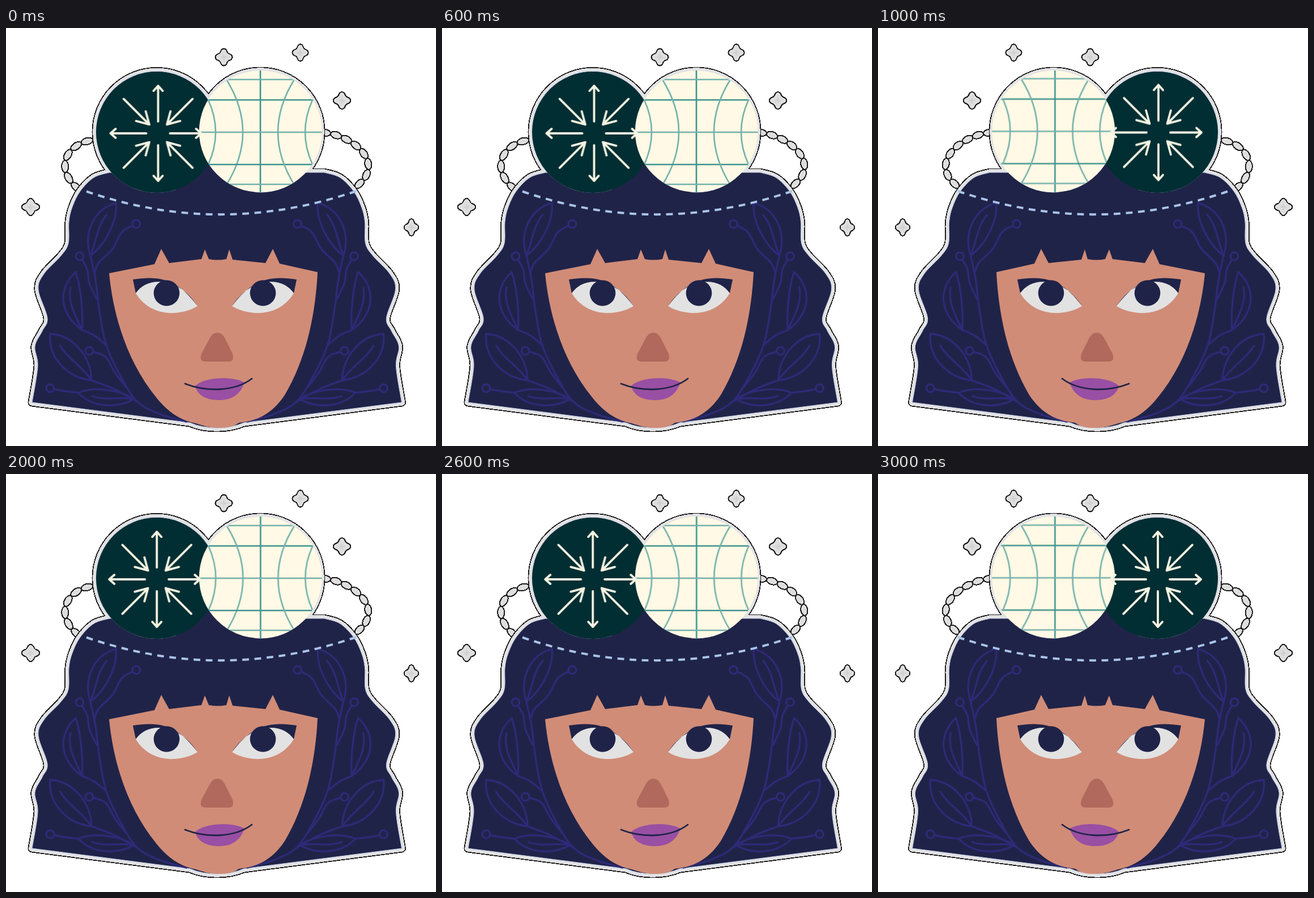
An HTML page for the animation above (4000 ms loop, 759 px wide and 738 px high).

```html
<!DOCTYPE html>
<html lang="en">
<head>
<meta charset="utf-8">
<title>Portrait sticker</title>
<style>
html, body { margin: 0; width: 100%; height: 100%; overflow: hidden; background: #fff; }
svg { display: block; width: 759px; height: 738px; }
#scene { animation: flip 2s step-end infinite; }
#grid { animation: grid 4s step-end infinite; }
#arrows { animation: arrows 4s step-end infinite; }
@keyframes flip {
  0% { transform: none; }
  50%, 100% { transform: translateX(759px) scaleX(-1); }
}
@keyframes grid {
  0% { transform: translate(449px, 184px); }
  25% { transform: translate(446.5px, 182.5px); }
  50% { transform: translate(449.3px, 184px); }
  75%, 100% { transform: translate(446.5px, 183.3px); }
}
@keyframes arrows {
  0% { transform: translate(268.5px, 186px); }
  25% { transform: translate(495px, 184.5px); }
  50% { transform: translate(266.2px, 186px); }
  75%, 100% { transform: translate(494px, 186px); }
}
.line { fill: none; stroke-linecap: round; stroke-linejoin: round; }
.rim { fill: none; stroke-linejoin: round; shape-rendering: crispEdges; }
.chip { fill: #dedede; stroke: #1c1c1c; stroke-width: 2; shape-rendering: crispEdges; }
.bud { fill: #202348; }
</style>
</head>
<body>
<svg viewBox="0 0 759 738">
  <defs>
    <path id="half"/>
    <g id="shape">
      <use href="#half"/>
      <use href="#half" transform="matrix(-1 0 0 1 744.5 0)"/>
      <circle cx="266" cy="183.5" r="107"/>
      <circle cx="449" cy="183" r="107"/>
    </g>
    <clipPath id="disc"><ellipse cx="449.3" cy="182.6" rx="108.5" ry="107.5"/></clipPath>
    <g id="vine"></g>
    <g id="eye">
      <path fill="#e2e2e2" d="M229 468C240 453 253 447 270 447C300 447 320 466 338 491C306 510 254 510 229 468Z"/>
      <circle cx="283.5" cy="468" r="22.8" fill="#202348"/>
      <path fill="#202348" d="M224 444C275 436 304 446 338 491C322 466 298 449 270 448C250 448 238 456 229 468Z"/>
    </g>
  </defs>

  <g id="scene">
    <g id="chips"></g>
    <use href="#shape" class="rim" stroke="#1c1c1c" stroke-width="15"/>
    <use href="#shape" class="rim" stroke="#e2e2e5" stroke-width="11.5"/>
    <use href="#shape" fill="#202348" stroke="#c5d2e4" stroke-width="1"/>
    <path fill="#202348" d="M300 240H440V300H300Z"/>

    <g class="line" stroke="#2e2a78" stroke-width="3.3">
      <use href="#vine"/>
      <use href="#vine" transform="matrix(-1 0 0 1 744.5 0)"/>
    </g>
    <path fill="none" stroke="#a9c4e8" stroke-width="4" pathLength="22.55" stroke-dasharray=".55 .45"
      d="M142 288.5Q378 370 618 288"/>

    <path fill="#d08c77" d="M182 433L262 417L274 390L288 415L345 408L351 391L358 408Q373 411 389 408L394 391L400 409L458 415L471 390L483 416L550 431
      C546 510 529 585 492 648C468 684 440 694 411 697C400 705 390 706 375 706C358 706 345 701 335 698C306 692 285 677 265 652C217 593 190 515 182 433Z"/>
    <use href="#eye"/>
    <use href="#eye" transform="matrix(-1 0 0 1 737 0)"/>
    <path fill="#b0695c" d="M373 538Q381 538 386 547L400 575Q404 589 392 589H353Q340 589 345 575L360 547Q365 538 373 538Z"/>
    <path fill="#994fa3" d="M334 632C350 616 400 614 421 626C413 648 398 657 376 657C354 657 338 649 334 632Z"/>
    <path class="line" stroke="#202348" stroke-width="2.8" d="M316 628C354 643 404 642 434 619"/>

    <circle cx="266" cy="184" r="107" fill="#012e33"/>
    <g clip-path="url(#disc)">
      <rect x="335" y="70" width="230" height="225" fill="#fff9e5"/>
      <g id="grid" class="line" stroke-width="2.6"></g>
    </g>
  </g>
  <g id="arrows" class="line" stroke="#f5f3e1" stroke-width="3.8"></g>
</svg>
<script>
const byId = id => document.getElementById(id);
const add = (parent, tag, attrs) => {
  const el = document.createElementNS('http://www.w3.org/2000/svg', tag);
  for (const key in attrs) el.setAttribute(key, attrs[key]);
  return byId(parent).appendChild(el);
};

// Smooth curve through "x y, x y, ..."
const spline = text => {
  const pts = text.split(',').map(p => p.trim().split(' ').map(Number));
  const at = i => pts[Math.max(0, Math.min(pts.length - 1, i))];
  const handle = (i, s) => at(i).map((v, k) => v + s * (at(i + 1)[k] - at(i - 1)[k]) / 6);
  let d = pts[0].join(' ');
  for (let i = 1; i < pts.length; i++) d += `C${[...handle(i - 1, 1), ...handle(i, -1), ...pts[i]].join(' ')}`;
  return d;
};

// Half of the hair
const wave = spline('183 255, 155 264, 131 288, 117 316, 111 342, 110 380, 97 402, 67 434, 57 462, 73 512, 64 535, 51 562, 56 597, 46 661');
byId('half').setAttribute('d', `M373 225L250 255L${wave}L325 697Q345 706 373 706`);

// Vine
const stem = text => add('vine', 'path', { d: 'M' + spline(text) });
const bud = (x, y, path) => {
  stem(`${x} ${y}, ${path}`);
  add('vine', 'circle', { class: 'bud', cx: x, cy: y, r: 6.8 });
};
const leaf = (x, y, tipX, tipY, ...sides) => {
  const dx = tipX - x, dy = tipY - y, len = Math.hypot(dx, dy);
  const at = (f, o) => `${x + dx * f - dy / len * o} ${y + dy * f + dx / len * o}`;
  for (const o of sides) add('vine', 'path', { d: `M${x} ${y}C${at(.3, o)} ${at(.75, o)} ${tipX} ${tipY}` });
  const mid = (sides[0] + sides[1]) / 2;
  add('vine', 'path', { d: `M${x} ${y}C${at(.3, mid + 5)} ${at(.5, mid - 5)} ${at(.75, mid * .8)}` });
};
stem('149 402, 158 445, 165 500, 177 560, 204 618, 232 660, 270 681, 318 695');
stem('134 533, 156 543, 177 560');
stem('151 622, 192 638, 232 660');
leaf(149, 402, 194, 309, -30, 16);
leaf(134, 533, 123, 431, -36, 6);
leaf(151, 622, 78, 540, -30, 28);
leaf(226, 655, 128, 644, -22, 14);
bud(230, 346, '205 360, 188 390, 164 414, 157 430');
bud(130, 403, '143 425, 147 450, 160 478');
bud(147, 570, '175 580, 192 608, 212 634');
bud(78, 636, '103 641, 128 644');

// Globe lines
const rule = (d, stroke) => add('grid', 'path', { d, stroke });
const dark = '#3c938e', pale = '#72b1ab';
rule('M0-115V115', dark);
for (const y of [-93, 0, 92]) rule(`M-115 ${y}H115`, pale);
for (const s of [-1, 1]) {
  rule(`M-115 ${57 * s}H115`, dark);
  rule(`M${60 * s}-93Q${2 * s} 0 ${60 * s} 93M${92 * s}-57Q${66 * s} 0 ${92 * s} 57`, pale);
}

// Arrows: straight ones point out, diagonal ones point in
for (let i = 0; i < 8; i++) {
  const tip = i ? 84 : 76;
  add('arrows', 'path', {
    d: i % 2 ? 'M86 0H22M43-12L22 0L43 12' : `M21 0H${tip}m-9-8l9 8l-9 8`,
    transform: `rotate(${i * 45})`
  });
}

// Beads strung evenly on a curve
const string = (d, count) => {
  const path = add('chips', 'path', { d, fill: 'none' });
  const step = path.getTotalLength() / (count - 1);
  for (let i = 0; i < count; i++) {
    const p = path.getPointAtLength(i * step), q = path.getPointAtLength(i * step + (i ? -1 : 1));
    const turn = Math.atan2(q.y - p.y, q.x - p.x) * 180 / Math.PI;
    add('chips', 'ellipse', { class: 'chip', rx: step / 2, ry: 6, transform: `translate(${p.x} ${p.y}) rotate(${turn})` });
  }
};
string('M143 200C110 208 85 245 124 281', 6);
string('M563 185C610 190 668 235 624 275', 8);

// Four-lobed sparkles
const spark = (x, y, w = 1) => {
  let d = '';
  for (let a = 0; a < 360; a += 6) {
    const t = a * Math.PI / 180, r = 12.6 + 2.4 * Math.cos(4 * t);
    d += `${a ? 'L' : 'M'}${x + w * r * Math.cos(t)} ${y + r * Math.sin(t)}`;
  }
  add('chips', 'path', { class: 'chip', d: d + 'Z' });
  add('chips', 'path', { d: `M${x - 5} ${y}h10M${x} ${y - 5}v10`, stroke: '#d2d2d2', 'stroke-width': 3 });
};
spark(384.5, 51.5);
spark(519.5, 43.5, .94);
spark(593, 128, 1.03);
spark(43.5, 316, 1.06);
spark(715.5, 352, .86);
</script>
</body>
</html>
```
